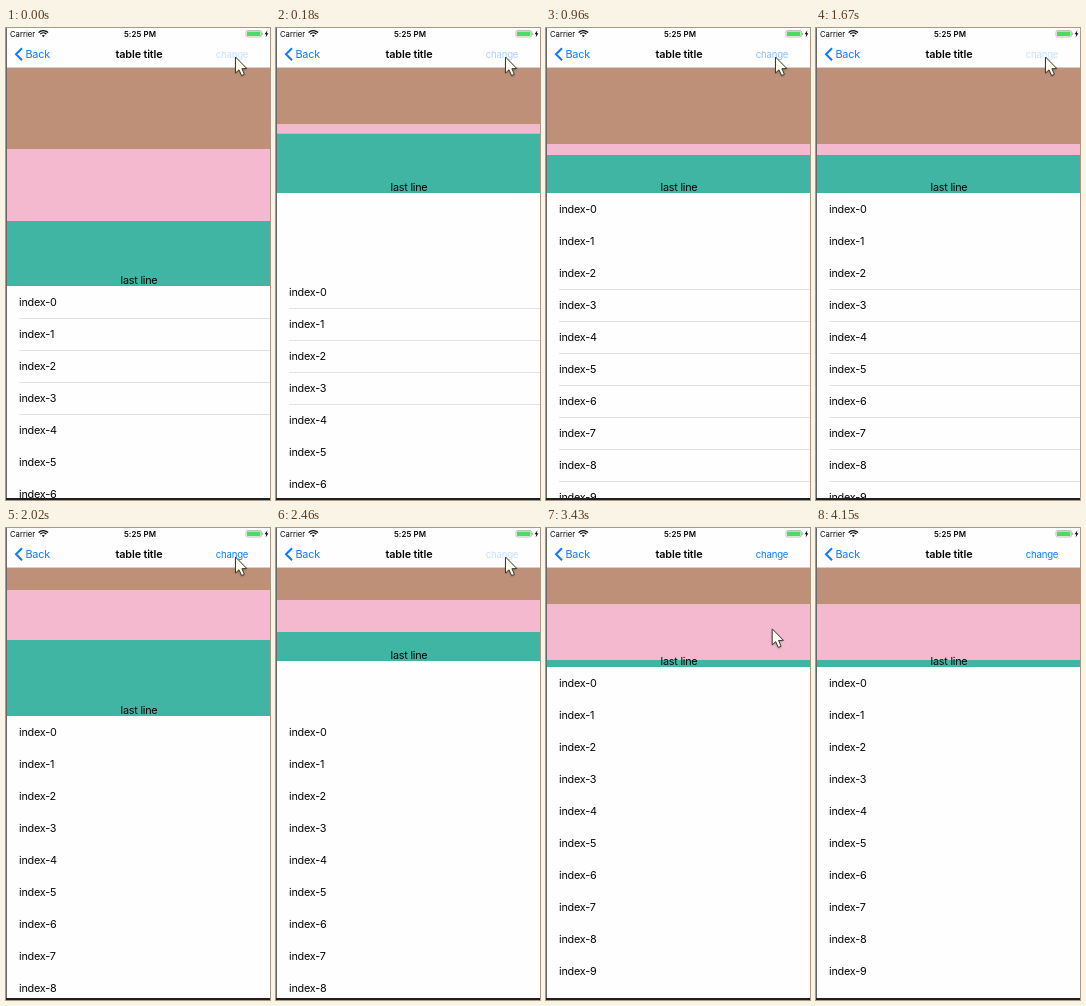
Write an HTML page with a canvas that moves like this. It is 264 px wide and 472 px high and loops after 4.2 s.

```html
<!DOCTYPE html>
<html lang="en">
<head>
<meta charset="utf-8">
<title>Table header</title>
<style>
html, body { margin: 0; width: 264px; height: 472px; overflow: hidden; background: #fff }
canvas { display: block; width: 264px; height: 472px }
</style>
</head>
<body>
<canvas id="stage"></canvas>
<script>
const W = 264, H = 472, LOOP = 4200, STEP = 87.8, ROW = 32;
const BLUE = '#0a7cfb', BLACK = '#050505';
const canvas = document.getElementById('stage');
const ctx = canvas.getContext('2d');
const ratio = window.devicePixelRatio || 1;
canvas.width = W * ratio;
canvas.height = H * ratio;

// press: step of the tap; bands: bottom edges; lines: first and last visible separator
const layouts = [
  { press: -9,  bands: [121, 193, 258], lines: [1, 4] },
  { press: 0.5, bands: [96.5, 105.5, 165], lines: [3, 99] },
  { press: 9,   bands: [116, 127, 165], lines: [3, 99] },
  { press: 19,  bands: [62, 112, 188],  lines: [1, 0] },
  { press: 27,  bands: [72, 104, 133],  lines: [4, 99] },
  { press: 35,  bands: [76.5, 132, 139], lines: [1, 0] }
];
const bandColors = ['#be9078', '#f4b8cf', '#41b5a4'];

const clamp = x => Math.max(0, Math.min(1, x));
const easeInOut = x => x * x * (3 - 2 * x);
const mix = (a, b, p) => a + (b - a) * p;

function rect(x, y, w, h, color) {
  ctx.fillStyle = color;
  ctx.fillRect(x, y, w, h);
}

function text(str, x, y, { size = 10.85, weight = 400, color = BLACK, align = 'left', track = -0.25 } = {}) {
  ctx.font = `${weight} ${size}px Inter, "Liberation Sans", sans-serif`;
  ctx.letterSpacing = track + 'px';
  ctx.textAlign = align;
  ctx.fillStyle = color;
  ctx.fillText(str, x, y);
}

function path(points, closed) {
  ctx.beginPath();
  points.forEach(([x, y]) => ctx.lineTo(x, y));
  if (closed) ctx.closePath();
}

function stroke(color, width) {
  ctx.strokeStyle = color;
  ctx.lineWidth = width;
  ctx.stroke();
}

function drawRows(top, [first, last]) {
  for (let i = 0; top + i * ROW < H; i++) {
    const y = top + i * ROW;
    text('index-' + i, 13, y + 20);
    if (i >= first && i <= last) rect(13, Math.round(y), W - 13, 1, '#e2e2e4');
  }
}

function drawHeader(bands) {
  let top = 40;
  bands.forEach((bottom, i) => {
    rect(0, top, W, bottom - top, bandColors[i]);
    top = bottom;
  });
  text('last line', 133, top - 2, { align: 'center' });
}

function drawStatus() {
  text('Carrier', 4, 8.5, { size: 7.7, track: 0 });
  text('5:25 PM', 134, 8.5, { size: 7.9, weight: 600, align: 'center', track: 0.1 });
  for (const r of [2, 4.2, 6.4]) {
    ctx.beginPath();
    ctx.arc(37.3, 9, r, -Math.PI * 0.76, -Math.PI * 0.24);
    if (r === 2) {
      ctx.lineTo(37.3, 9);
      ctx.fillStyle = BLACK;
      ctx.fill();
    } else stroke(BLACK, 1.3);
  }
  ctx.beginPath();
  ctx.roundRect(240, 2.5, 15.5, 6.5, 1.6);
  stroke('#a4a8a4', 0.7);
  rect(241, 3.5, 13.5, 4.5, '#4cd964');
  rect(256.2, 4.7, 0.9, 2.2, '#a4a8a4');
  path([[261.4, 2.2], [258.6, 6.2], [260.3, 6.2], [259.6, 9.4], [262.4, 5.2], [260.7, 5.2]], true);
  ctx.fillStyle = BLACK;
  ctx.fill();
}

function drawNav(buttonAlpha) {
  rect(0, 0, W, 40, '#fefefe');
  rect(0, 39.5, W, 0.6, '#a9a5a3');
  drawStatus();
  path([[16, 20.2], [10, 26.2], [16, 32.2]]);
  stroke(BLUE, 2);
  text('Back', 19.5, 30, { color: BLUE });
  text('table title', 133, 30, { weight: 600, align: 'center', track: -0.15 });
  ctx.globalAlpha = buttonAlpha;
  text('change', 226, 29.5, { size: 9.6, color: BLUE, align: 'center', track: -0.2 });
  ctx.globalAlpha = 1;
}

function drawCursor(x, y) {
  ctx.save();
  ctx.translate(x, y);
  path([[0.5, 0], [0.5, 16], [4, 12.8], [6.6, 18.6], [9.4, 17.3], [6.9, 11.7], [11.8, 11.5]], true);
  ctx.shadowColor = 'rgba(0,0,0,.35)';
  ctx.shadowBlur = 2 * ratio;
  ctx.shadowOffsetY = ratio;
  ctx.fillStyle = '#fffdee';
  ctx.fill();
  ctx.shadowColor = 'transparent';
  stroke('#3d3a36', 1);
  ctx.restore();
}

function draw(now) {
  const step = Math.floor((now % LOOP + 10) / STEP);
  let i = layouts.length - 1;
  while (step - layouts[i].press <= -1) i--;
  const since = step - layouts[i].press;
  const next = layouts[i], prev = layouts[Math.max(0, i - 1)];

  // The header jumps one step after the tap; the rows then slide after it.
  const slide = easeInOut(clamp((since - 0.9) / 3));
  const top = mix(prev.bands[2], next.bands[2], slide);

  ctx.setTransform(ratio, 0, 0, ratio, 0, 0);
  rect(0, 0, W, H, '#fefefe');
  drawRows(top, (slide < 0.5 ? prev : next).lines);
  drawHeader((since < 0.5 ? prev : next).bands);
  drawNav(mix(0.22, 1, clamp((since - 1) / 3)));
  rect(0, 0, 1, H, '#6b6868');
  rect(0, 470, W, 2, '#201f20');

  if (step < 47) {
    const p = clamp((step - 38.5) / 5.5);
    const gone = 1 - (1 - p) ** 2;
    drawCursor(mix(229, 210, gone), mix(29, 443, gone));
  }
}

const start = performance.now();
function tick() {
  draw(performance.now() - start);
  requestAnimationFrame(tick);
}
tick();
</script>
</body>
</html>
```
